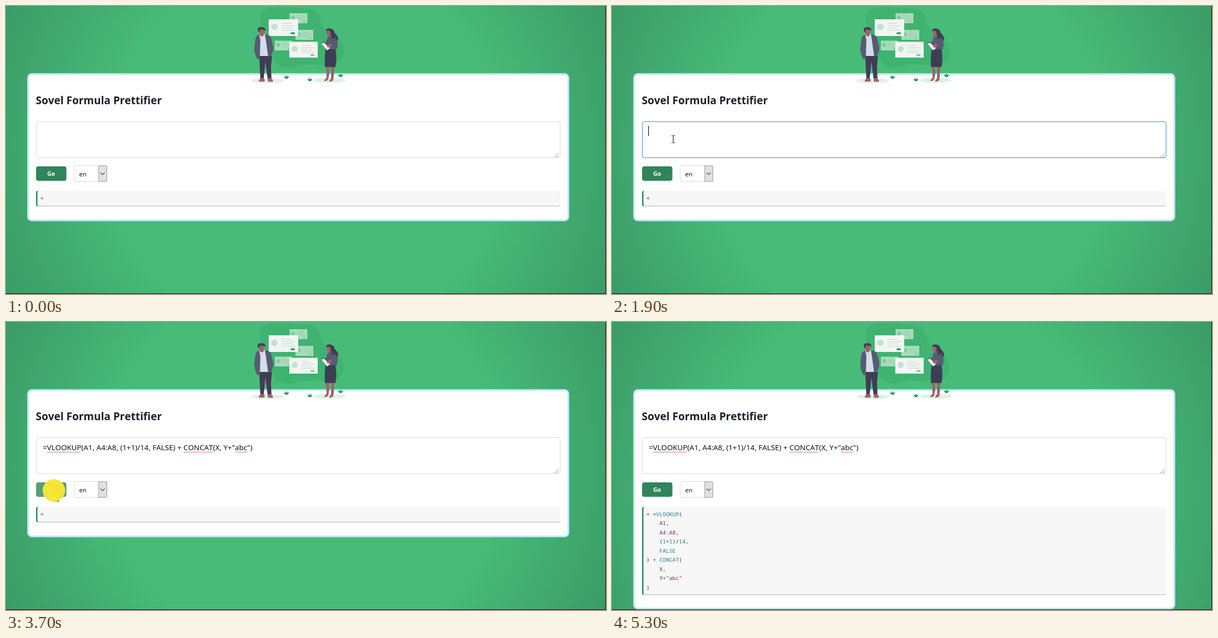
An HTML page for the animation above (5.4 s loop, 1078 px wide and 519 px high).

```html
<!DOCTYPE html>
<html lang="en">
<head>
<meta charset="utf-8">
<title>Formula Prettifier</title>
<style>
html, body { margin: 0; width: 100%; height: 100%; overflow: hidden; background: #48bb78; }
svg { display: block; width: 1078px; height: 519px; }
text { white-space: pre; font-family: "Noto Sans", "Open Sans", sans-serif; font-kerning: none; }
.code text { font: 9.75px "Noto Sans Mono", "DejaVu Sans Mono", monospace; fill: #333; }
.code .fn { fill: #1c7fa3; }
.code .ref { fill: #8a1c50; }
.code .num { fill: #117a7a; }
.code .str { fill: #a3123f; }
</style>
</head>
<body>
<svg id="stage" viewBox="0 0 1078 519" xmlns="http://www.w3.org/2000/svg"></svg>
<script>
const LOOP = 5400, STEP = 100;
const FOCUS = 1600, PASTE = 2200, CLICK = 3700, RESULT = 3800;
const SHOW = 300, HIDE = 5200;

const attrs = o => Object.entries(o).map(([k, v]) => ` ${k}="${v}"`).join('');
const tag = (name, o, body = '') => `<${name}${attrs(o)}>${body}</${name}>`;
const rect = (x, y, width, height, fill, o = {}) => tag('rect', { x, y, width, height, fill, ...o });
const path = (d, fill, o = {}) => tag('path', { d, fill, ...o });
const line = (d, stroke, o = {}) => path(d, 'none', { stroke, ...o });
const oval = (cx, cy, rx, ry, fill) => tag('ellipse', { cx, cy, rx, ry, fill });
const label = (x, y, size, fill, body, o = {}) => tag('text', { x, y, 'font-size': size, fill, ...o }, body);
const group = (id, body, o = {}) => tag('g', { id, ...o }, body);

// Profile card of the illustration
function profile(x, y, w, h, strong) {
  const s = h / 29, bar = strong ? '#bcd9c8' : '#8fcba8';
  let out = rect(x, y, w, h, strong ? '#f3f5f4' : '#a7dcbb');
  out += oval(x + 10 * s, y + 13 * s, 5.6 * s, 5.6 * s, strong ? '#c2e2ce' : '#83c79e');
  [17, 24, 20, 24].forEach((len, i) => {
    out += rect(x + 22 * s, y + (6.5 + i * 4) * s, len * s, 1 * s, bar);
  });
  return out + rect(x + w - 13 * s, y + h - 6.2 * s, 7 * s, 3 * s, strong || '#83c79e');
}

const leaf = (x, y) => path(`M${x - 4} ${y - 2}q3 0 3.4 2q-.6-3 .6-4q1.500 1 .8 4q.6-2 3.200-2q0 3.500-3 4.500h-2q-3-1-3-4.500z`, '#159947');

function man() {
  return path('M455 90L478 90L476 110L477 131L470 131L466 100L463 131L457 131Z', '#3f3d56')
    + path('M457 130h6.500l1.500 4q0 2-2 2.300h-8q-2-1 0-3zM470 130h6.500l3 4q1 2-1 2.500h-8z', '#a0616a')
    + path('M454 52L468 50L473 90H455Z', '#d3dde8')
    + path('M455 45h8v8q-4 3-7 0z', '#a0616a')
    + path('M455 52Q449 53 448 59L446 77Q446 84 451 95L456 96L457 62ZM465 50Q474 52 476 57L480 73Q481 80 476 91L471 91L467 62Z', '#575a73')
    + oval(459, 44, 5, 6, '#a0616a')
    + path('M452.500 45Q451 38 458 38Q467 38 466 45L463 43L456 42L455 48Z', '#3f3d56');
}

function woman() {
  return path('M575 108h5l1 14l-2 10l-3 3h-5l5-6zM584 108h6l-1 17l-1 9l-4 2h-4l4-6z', '#a0616a')
    + path('M575 43Q578 39 584 41Q588 41 589 47Q597 54 597 60Q595 66 587 64Q581 59 582 53L576 46Z', '#3f3d56')
    + path('M576 45q5-2 7 2l1 9l-5 1l-1-5q-3-2-2-7z', '#a0616a')
    + path('M578 56Q586 53 593 58Q597 66 595 76L592 80H574L575 69L567 69L568 65L575 65Z', '#575a73')
    + path('M574 78L592 78Q595 95 592 110H573Q572 92 574 78Z', '#3f3d56')
    + path('M567 68L571 66L582 76L577 80Z', '#f3f5f4')
    + path('M580 68l6 2l-4 5l-6-1z', '#a0616a')
    + path('M584 43Q591 42 590 49Q589 56 594 58L586 59Q582 50 584 43Z', '#3f3d56');
}

function illustration() {
  return path('M457 14C466-2 496 0 522 4C552 2 566 12 566 30C568 43 589 52 603 68C614 86 600 106 582 107C557 108 546 101 521 109C496 116 482 105 479 90C474 66 453 42 457 14Z', '#3fb36f')
    + profile(509.500, 13, 32, 18)
    + profile(520, 43, 32, 18)
    + profile(483, 62.500, 31, 17.500)
    + profile(472, 24, 53, 30, '#159947')
    + profile(509, 64.500, 51, 28.500, '#72c7a3')
    + oval(469, 134.500, 29, 4.600, '#e0f1e6') + oval(581, 134, 29, 4.600, '#e0f1e6')
    + man() + woman() + leaf(504, 128.500) + leaf(546, 133) + leaf(601, 125.500);
}

function squiggle(x, end) {
  let d = `M${x} 233.500`;
  for (let i = 0; x + i * 2 < end; i++) d += `l2 ${i % 2 ? -2 : 2}`;
  return line(d, '#d8484c', { 'stroke-width': 0.9 });
}

const span = (cls, s) => tag('tspan', { class: cls }, s);
const fn = s => span('fn', s), ref = s => span('ref', s), num = s => span('num', s);
const codeLines = [
  `= =${fn('VLOOKUP')}(`,
  `    ${ref('A1')},`,
  `    ${ref('A4:A8')},`,
  `    (${num(1)}+${num(1)})/${num(14)},`,
  `    ${fn('FALSE')}`,
  `) + ${fn('CONCAT')}(`,
  '    X,',
  `    Y+${span('str', '"abc"')}`,
  ')'
];
const codeText = lines => lines.map((s, i) => tag('text', { x: 61.8, y: 350 + i * 16.450 }, s)).join('');

function grip() {
  let out = '';
  for (let r = 0; r < 3; r++)
    for (let c = 0; c <= r; c++) out += rect(991 - c * 3, 265 + r * 3, 1.3, 1.3, '#777');
  return out;
}

const beam = line('M-3 -6.500h2.500M.500 -6.500h2.500M0 -6v12M-3 6.500h2.500M.500 6.500h2.500', '#222', { 'stroke-width': 1.2 });
const arrow = path('M0 0V16L3.800 12.500L6.300 18.200L8.800 17.200L6.400 11.500H11.500Z', '#fff', { stroke: '#111' });
const hand = path('M-1.500 1.200Q0-1 1.600 1.200V7.500Q3.500 6 4.700 8Q6.400 7 7.400 8.800Q9.200 8 9.400 10.500V14Q8.500 17 7.400 20H0Q-1 17-4.500 12.500Q-5.500 10-3.300 10.200L-1.500 12Z', '#fff', { stroke: '#111' })
  + line('M1.600 7v4M4.700 8v3.500M7.400 9v3', '#111', { 'stroke-width': 0.8 });

const stage = document.getElementById('stage');
stage.innerHTML =
  tag('defs', {}, tag('radialGradient', { id: 'glow', gradientUnits: 'userSpaceOnUse', cx: 539 },
    tag('stop', { offset: 0.58, 'stop-color': '#48bb78' }) + tag('stop', { offset: 1, 'stop-color': '#3b9b67' })))
  + rect(0, 0, 1078, 519, 'url(#glow)')
  + rect(39.500, 122.500, 971, 0, '#fff', { id: 'card', rx: 7, stroke: '#bee3f8', 'stroke-width': 3 })
  + illustration()
  + label(53.500, 177, 19, '#1a202c', 'Sovel Formula Prettifier', { 'font-weight': 700 })
  + rect(54.500, 208.500, 941, 65, '#fff', { id: 'field', rx: 3.5 })
  + grip()
  + group('formula', label(66, 231, 13.310, '#111', '=VLOOKUP(A1, A4:A8, (1+1)/14, FALSE) + CONCAT(X, Y+"abc")')
    + squiggle(74, 134) + squiggle(319, 371) + squiggle(412, 433))
  + rect(65, 216, 1.2, 18, '#111', { id: 'caret' })
  + rect(54, 289, 54.500, 26, '#2f855a', { id: 'button', rx: 4 })
  + label(81, 306, 10.600, '#fff', 'Go', { 'font-weight': 700, 'text-anchor': 'middle' })
  + rect(122.500, 287.500, 59, 29, '#fff', { rx: 3.5, stroke: '#dcdcdc' })
  + label(131.500, 306.500, 11, '#111', 'en')
  + rect(166.500, 288, 14.500, 28, '#e1e1e1', { stroke: '#a2a2a2' })
  + line('M169.800 300.200l3.800 3.800l3.800-3.800', '#444', { 'stroke-width': 1.1 })
  + rect(54, 334, 942, 0, '#b4b4b4', { id: 'edge', rx: 4 })
  + rect(54, 333, 942, 0, '#f7f7f7', { id: 'panel', rx: 4 })
  + path('', '#2f855a', { id: 'bar' })
  + group('empty', codeText(['=']), { class: 'code' })
  + group('result', codeText(codeLines), { class: 'code' })
  + group('cursor', group('beam', beam) + group('arrow', arrow) + group('hand', hand))
  + tag('circle', { id: 'pulse', fill: '#f8e836' })
  + rect(1077, 0, 1, 519, '#0c150f') + rect(0, 518, 1078, 1, '#0c150f');

const el = id => document.getElementById(id);
const set = (id, o) => { for (const k in o) el(id).setAttribute(k, o[k]); };
const show = (id, on) => set(id, { visibility: on ? 'visible' : 'hidden' });

// Pointer stops: time, x, y
const route = [
  [300, 150, 448], [600, 146, 382], [900, 98, 300], [1100, 106, 250], [1300, 110, 240],
  [2300, 110, 240], [2800, 106, 259], [3000, 82, 283], [3200, 87, 310], [3600, 87, 303],
  [4200, 87, 303], [4500, 322, 450], [4800, 112, 404], [5100, 110, 402]
];

function pointer(t) {
  const next = route.findIndex(p => p[0] > t);
  if (next < 0) return route[route.length - 1].slice(1);
  if (!next) return route[0].slice(1);
  const a = route[next - 1], b = route[next], k = (t - a[0]) / (b[0] - a[0]);
  return [a[1] + (b[1] - a[1]) * k, a[2] + (b[2] - a[2]) * k];
}

const inside = ([x, y], l, t, r, b) => x >= l && x <= r && y >= t && y <= b;

function draw(ms) {
  const t = Math.floor(ms % LOOP / STEP) * STEP;
  const done = t >= RESULT, focused = t >= FOCUS && t < CLICK, pasted = t >= PASTE;
  const bottom = done ? 491 : 360;

  set('glow', { cy: done ? 310 : 260, r: done ? 622 : 598 });
  set('card', { height: done ? 394 : 264 });
  set('field', { stroke: focused ? '#4b8fb8' : '#dcdcdc' });
  set('edge', { height: bottom - 333 });
  set('panel', { height: bottom - 333 });
  set('bar', { d: `M58 333Q54 333 54 337V${bottom - 3}Q54 ${bottom + 1} 58 ${bottom + 1}Q56.500 ${bottom} 56.500 ${bottom - 3}V337Q56.500 334 58 333Z` });
  show('empty', !done);
  show('result', done);

  const blinkStart = pasted ? PASTE : FOCUS;
  show('formula', pasted);
  show('caret', focused && Math.floor((t - blinkStart) / 500) % 2 === 0);
  set('caret', { x: pasted ? 443 : 65 });

  const at = pointer(t), visible = t >= SHOW && t < HIDE;
  const onButton = inside(at, 54, 289, 108, 315);
  const onText = inside(at, 54, 209, 996, 273) || inside(at, 54, 333, 996, bottom);
  const shape = onButton ? 'hand' : onText ? 'beam' : 'arrow';
  for (const id of ['beam', 'arrow', 'hand']) show(id, visible && id === shape);
  set('cursor', { transform: `translate(${at})` });
  set('button', { fill: t === CLICK ? '#5a9b7a' : visible && onButton ? '#38895f' : '#2f855a' });

  const age = (t - (t < CLICK ? FOCUS : CLICK)) / STEP;
  const pulsing = age >= 0 && age < 3;
  show('pulse', pulsing);
  if (pulsing) set('pulse', { cx: at[0] - 1, cy: at[1] + 0.5, r: 20.3 - age * 5.6, opacity: [0.97, 0.76, 0.45][age] });
}

function tick() {
  draw(performance.now());
  requestAnimationFrame(tick);
}
tick();
</script>
</body>
</html>
```
